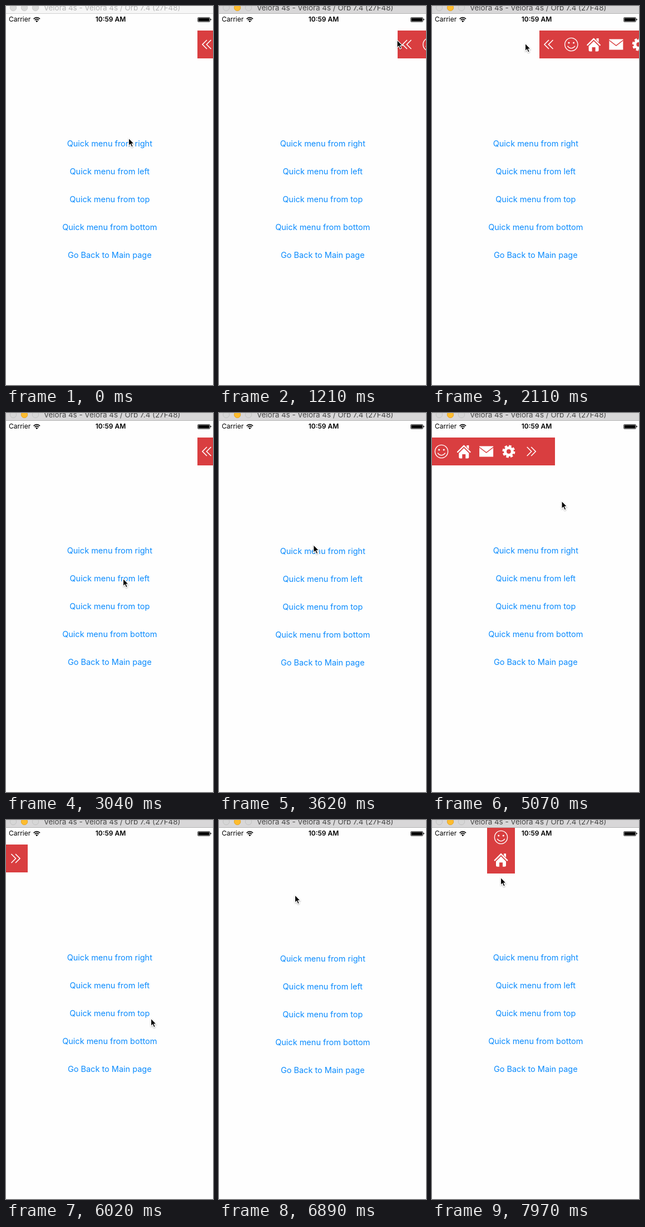
These frames come from a looping animation (372 by 680 pixels, 8 s). An HTML page:

```html
<!DOCTYPE html>
<html lang="en">
<head>
<meta charset="utf-8">
<title>Quick menu</title>
<style>
  html, body { margin: 0; width: 100%; height: 100%; overflow: hidden; background: #fefefe; }
  svg { display: block; }
  text { font-family: Inter, Roboto, sans-serif; }
  .link { font-size: 14.5px; fill: #0a8bfe; text-anchor: middle; }
  .line { fill: none; stroke: #fff; }
  #bar { fill: #f6f6f6; }
  #edge { fill: #d2d2d2; }
  #title { font-size: 13.4px; fill: #b4b4b4; }
  .light { fill: #dadada; stroke: #cbcbcb; }
  .focused #bar { fill: #d8d7d8; }
  .focused #edge { fill: #b3b3b3; }
  .focused #title { fill: #474747; }
  .focused .light { fill: #d6d6d6; stroke: #c2c2c2; }
  .focused #minimize { fill: #fdbc2f; stroke: #e3a52a; }
</style>
</head>
<body>
<svg width="372" height="680" viewBox="0 0 372 680">
  <defs>
    <path id="chevron" class="line" stroke-width="1.6" d="M0-8-8 0 0 8M7.5-8-.5 0 7.5 8"/>
    <g id="smile">
      <circle r="11.6" class="line" stroke-width="1.4"/>
      <circle cx="-4.3" cy="-3" r="1.6" fill="#fff"/>
      <circle cx="4.3" cy="-3" r="1.6" fill="#fff"/>
      <path class="line" stroke-width="1.4" d="M-6.8 2.8Q0 11 6.8 2.8"/>
    </g>
    <g id="house">
      <path class="line" stroke-width="2.4" stroke-linecap="round" stroke-linejoin="round" d="M-11.2 1 0-10.2 11.2 1"/>
      <path fill="#fff" d="M5-11H9V-4L5-8ZM0-6 9 3V10Q9 12.5 6.5 12.5H3V5H-3V12.5H-6.5Q-9 12.5-9 10V3Z"/>
    </g>
    <g id="mail">
      <rect x="-12.5" y="-9.5" width="25" height="19" fill="#fff"/>
      <path fill="none" stroke="#d93e40" stroke-width="1.5" d="M-12.5-7.5 0 2 12.5-7.5"/>
    </g>
    <g id="gear" class="line">
      <circle r="6.4" stroke-width="5"/>
      <circle r="9.2" stroke-width="4.6" stroke-dasharray="4.2 3.03"/>
    </g>
    <filter id="shadow" x="-50%" y="-50%" width="200%" height="200%">
      <feDropShadow dx="0" dy="1" stdDeviation=".8" flood-opacity=".35"/>
    </filter>
  </defs>

  <g id="pages"></g>

  <g id="status" font-size="12">
    <text x="5" y="28.3">Carrier</text>
    <path d="M49.6 23.2Q55.3 18 61 23.2M51.7 25.4Q55.3 22 58.9 25.4" fill="none" stroke="#000" stroke-width="1.7"/>
    <path d="M53.2 27Q55.3 25 57.4 27L55.3 29.2Z"/>
    <text x="188" y="28.3" font-weight="600" text-anchor="middle">10:59 AM</text>
    <rect x="344.5" y="20.5" width="22" height="8" rx="1.5" fill="none" stroke="#555"/>
    <rect x="345.5" y="21.5" width="20" height="6"/>
    <path d="M367.3 22.8Q369 23 369 24.3T367.3 25.8Z"/>
  </g>

  <g id="window">
    <rect id="bar" width="372" height="13"/>
    <rect id="edge" y="13" width="372" height="1"/>
    <circle class="light" cx="13" cy="3" r="5.7"/>
    <circle class="light" id="minimize" cx="33" cy="3" r="5.7"/>
    <circle class="light" cx="53" cy="3" r="5.7"/>
    <text id="title" x="68" y="7.5">Velora 4s - Velora 4s / Orb 7.4 (27F48)</text>
  </g>

  <path id="cursor" filter="url(#shadow)" stroke="#fff" stroke-width="1.1"
        d="M0 0V13.8L3.1 10.9 5.3 16 7.8 15 5.6 10H9.8Z"/>
</svg>
<script>
const DURATION = 8000;
const FOCUS_TIME = 890;
const FULL_SIZE = 221;
const DRAG_RATIO = 0.84;
const links = ["Quick menu from right", "Quick menu from left", "Quick menu from top",
               "Quick menu from bottom", "Go Back to Main page"];
const icons = ["smile", "house", "mail", "gear"];

// A page slides up at `start`; its menu follows the pointer from `grab` to `release`.
const pages = [
  { side: "right", turn: 0, rest: 28, start: -DURATION, grab: 920, release: 2110, close: 2440 },
  { side: "left", turn: 180, rest: 39, start: 3230, grab: 4390, release: 4840, close: 5680 },
  { side: "top", turn: -90, rest: 39, start: 6540, grab: 7350, release: DURATION, close: DURATION }
];

// Pointer moves: departure, arrival, and the point reached.
const pointerStart = [220.5, 237];
const moves = [
  { from: 170, to: 680, point: [347, 60] },
  { from: 920, to: 2110, point: [167.5, 67] },
  { from: 2120, to: 2230, point: [164, 78] },
  { from: 2460, to: 3020, point: [210.5, 297] },
  { from: 3400, to: 4010, point: [74.5, 95] },
  { from: 4100, to: 4300, point: [18, 72] },
  { from: 4390, to: 4840, point: [200, 124] },
  { from: 4890, to: 5340, point: [293, 219.5] },
  { from: 5700, to: 6020, point: [260.5, 356] },
  { from: 6030, to: 6490, point: [240, 350] },
  { from: 6550, to: 6890, point: [136.5, 134.5] },
  { from: 6900, to: 7280, point: [123.5, 52] },
  { from: 7350, to: 7960, point: [123.5, 103] }
];

const byId = id => document.getElementById(id);
const mix = (a, b, f) => a + (b - a) * f;

function ease(time, from, to) {
  const f = Math.min(1, Math.max(0, (time - from) / (to - from)));
  return f * f * (3 - 2 * f);
}

function pointerAt(time) {
  return moves.reduce(
    (here, { from, to, point }) => here.map((v, i) => mix(v, point[i], ease(time, from, to))),
    pointerStart);
}

function menuSize({ side, rest, start, grab, release, close }, time) {
  if (time < grab) return rest * ease(time, start + 520, start + 720);
  const axis = side === "top" ? 1 : 0;
  const drag = Math.abs(pointerAt(Math.min(time, release))[axis] - pointerAt(grab)[axis]);
  const open = mix(rest + DRAG_RATIO * drag, FULL_SIZE, ease(time, release, release + 150));
  return mix(open, rest, ease(time, close, close + 280));
}

function menuBox(side, size) {
  if (side === "right") return { x: 372 - size, y: 44, width: size, height: 50 };
  if (side === "left") return { x: 0, y: 44, width: size, height: 50 };
  return { x: 99, y: 14, width: 50, height: size };
}

function place(name, side, slot, turn = 0) {
  const along = 17 + 40.3 * slot;
  const [x, y] = side === "top" ? [25, along] : [along, 25];
  return `<use href="#${name}" transform="translate(${x} ${y}) rotate(${turn})"/>`;
}

function buildPage({ side, turn }) {
  const handleFirst = side === "right";
  const handle = slot => place("chevron", side, slot, turn);
  const row = icons.map((name, i) => place(name, side, handleFirst ? i + 1 : i)).join("");
  const texts = links.map((label, i) =>
    `<text class="link" x="186.3" y="${252 + 50 * i}">${label}</text>`).join("");
  return `<g class="page">
    <rect y="14" width="372" height="667" fill="#fefefe"/>
    ${texts}
    <svg class="menu" overflow="hidden">
      <rect width="100%" height="100%" fill="#d93e40"/>
      <g class="closed">${handle(0)}</g>
      <g class="open">${handle(handleFirst ? 0 : icons.length)}${row}</g>
    </svg>
  </g>`;
}

function show(element, visible) {
  element.style.display = visible ? "" : "none";
}

function drawPage(page, time) {
  show(page.element, time >= page.start);
  if (time < page.start) return;
  const phase = (time - page.start) * 0.0235;
  const offset = Math.round(667 * (1 + phase) * Math.exp(-phase));
  page.element.setAttribute("transform", `translate(0 ${offset})`);

  const size = Math.round(menuSize(page, time));
  const box = menuBox(page.side, size);
  for (const name in box) page.menu.setAttribute(name, box[name]);
  show(page.menu, size > 0);
  show(page.open, size > page.rest);
  show(page.closed, size <= page.rest);
}

function draw(now) {
  const time = now % DURATION;
  pages.forEach(page => drawPage(page, time));
  byId("window").classList.toggle("focused", time >= FOCUS_TIME);
  byId("cursor").setAttribute("transform", `translate(${pointerAt(time)})`);
  requestAnimationFrame(draw);
}

byId("pages").innerHTML = pages.map(buildPage).join("");
document.querySelectorAll(".page").forEach((element, i) => {
  pages[i].element = element;
  for (const part of ["menu", "open", "closed"]) pages[i][part] = element.querySelector("." + part);
});
draw(0);
</script>
</body>
</html>
```
